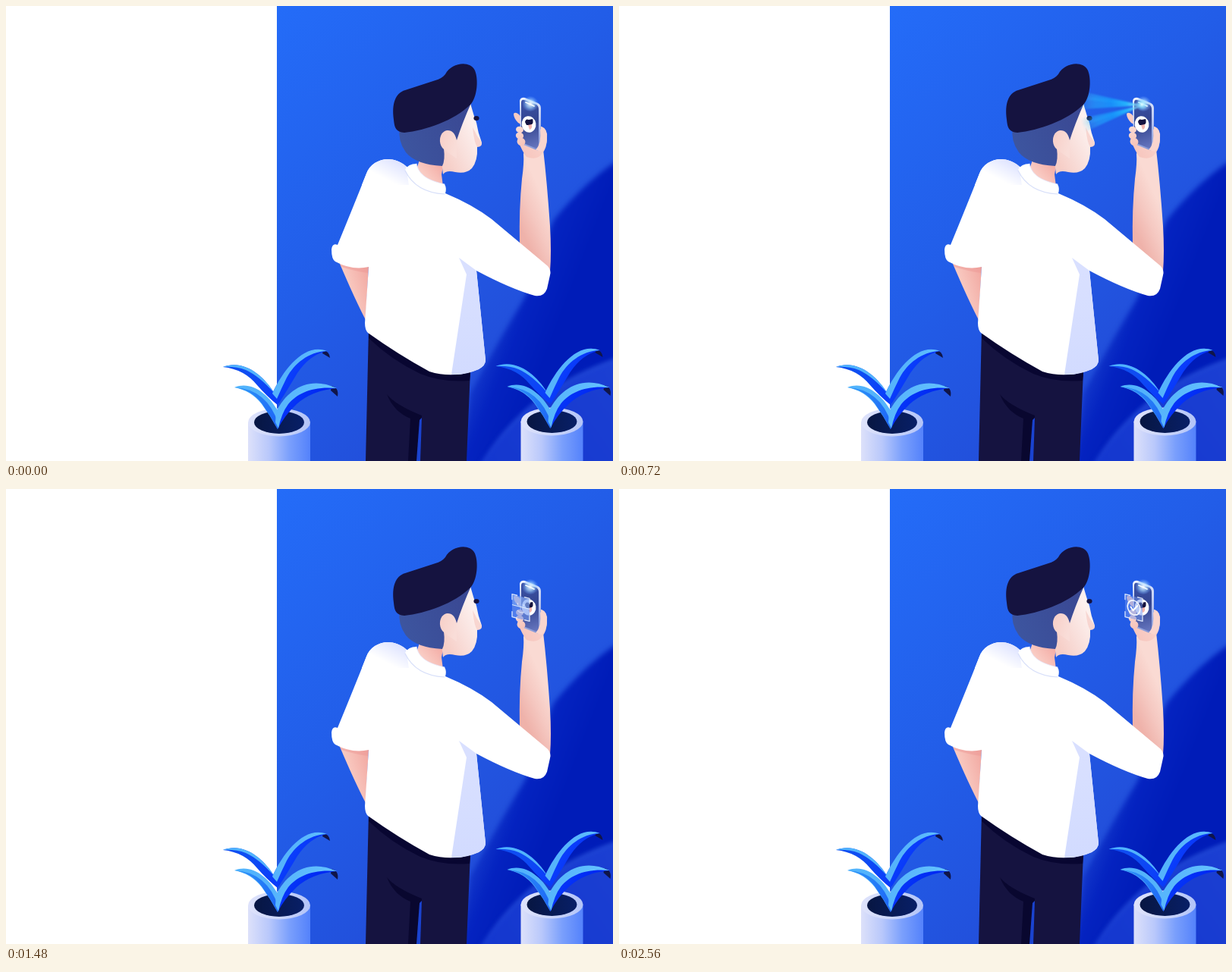
An HTML page with a canvas that plays this animation: 800 px wide and 600 px high, repeating every 3000 ms.

```html
<!DOCTYPE html>
<html lang="en">
<head>
<meta charset="utf-8">
<style>
html, body { margin: 0; width: 100%; height: 100%; overflow: hidden; background: #fff; }
canvas { display: block; width: 800px; height: 600px; }
</style>
</head>
<body>
<canvas id="stage" width="800" height="600"></canvas>
<script>
const ctx = document.getElementById('stage').getContext('2d');
const LOOP = 3000, STEP = 40, LAST = 2560;
const NAVY = '#151340';
let now = 0;

const clamp = v => Math.max(0, Math.min(1, v));
const ease = v => v * v * (3 - 2 * v);
const ramp = (t, a, b) => ease(clamp((t - a) / (b - a)));

function shape(d, paint) {
  ctx.fillStyle = paint;
  ctx.fill(new Path2D(d));
}

function line(d, paint, width) {
  ctx.strokeStyle = paint;
  ctx.lineWidth = width;
  ctx.lineCap = ctx.lineJoin = 'round';
  ctx.stroke(new Path2D(d));
}

function oval(x, y, rx, ry, paint, angle = 0) {
  ctx.fillStyle = paint;
  ctx.beginPath();
  ctx.ellipse(x, y, rx, ry, angle, 0, Math.PI * 2);
  ctx.fill();
}

function addStops(g, colors) {
  colors.forEach((c, i) => g.addColorStop(i / (colors.length - 1), c));
  return g;
}
const linear = (x0, y0, x1, y1, ...colors) =>
  addStops(ctx.createLinearGradient(x0, y0, x1, y1), colors);
const radial = (x, y, r, ...colors) =>
  addStops(ctx.createRadialGradient(x, y, 0, x, y, r), colors);

function wall() {
  ctx.fillStyle = '#fff';
  ctx.fillRect(0, 0, 800, 600);
  ctx.save();
  ctx.beginPath();
  ctx.rect(357, 0, 443, 600);
  ctx.clip();
  ctx.fillStyle = linear(357, 0, 780, 440, '#246cf8', '#225de8', '#224ad6');
  ctx.fillRect(357, 0, 443, 600);
  ctx.filter = 'blur(3px)';
  shape('M810 201 C770 227 744 256 722 282 C700 330 697 365 678 394 Q650 440 612 510 L600 610 L625 610 Q680 505 810 463Z',
    linear(605, 470, 695, 505, 'rgba(0,28,184,.1)', '#0423c0', '#001cb8'));
  shape('M622 610 Q684 510 810 465 V610Z', linear(630, 600, 800, 480, '#1437cf', '#1b3fd2'));
  ctx.restore();
}

function trousers() {
  shape('M478 425 L612 480 L607 600 H474Z', NAVY);
  shape('M478 428 L612 484 L611 494 Q575 497 546 485 Q508 467 478 438Z', '#080631');
  shape('M502 512 Q513 526 548 540 L544 600 H530 L533 544 Q511 535 502 512Z', '#09072f');
  shape('M545 546 L548 543 L546 600 H541Z', '#1a43d0');
}

function shirt() {
  shape('M440 340 L478 342 L474 414 Q459 385 440 340Z',
    linear(440, 370, 479, 358, '#fbd4cb', '#f2aaa3'));
  shape('M440 340 L478 342 L477 352 Q457 349 442 344Z', 'rgba(236,150,146,.45)');
  shape('M437 315 Q458 264 475 221 C482 202 508 195 527 211 L579 247 Q615 262 640 281 L714 343 Q719 349 717 355 L713 373 Q709 384 697 382 Q665 373 620 349 L632 467 Q632 474 623 479 Q590 492 558 482 Q516 459 477 431 Q473 427 473 418 L478 344 Q456 349 434 337 Q429 334 429 321 Q430 312 437 315Z', '#fff');
  shape('M475 221 C482 202 508 195 527 211 L531 236 L469 236Z',
    linear(505, 199, 492, 224, '#dfe4ff', '#fff'));
  shape('M597 332 L620 349 L632 467 Q632 474 623 479 Q606 487 587 486 L607 354Z',
    linear(600, 350, 610, 485, '#d9e0ff', '#d2dbff'));
}

function head(beam) {
  shape('M546 200 H578 L574 222 L576 238 Q553 234 541 215Z',
    linear(575, 208, 548, 232, '#f3aaa3', '#fbd6ce'));
  shape('M526 216 Q530 208 541 208 C544 223 556 230 578 235 Q581 240 579 247 Q549 249 531 228Z', '#fff');
  line('M526 217 Q540 246 578 248', '#d7dff9', 1.2);
  line('M541 208 C544 223 556 230 578 235', '#e6eaff', .8);

  shape('M612 128 Q616 143 620 154 Q622 167 627 180 Q628 185 621 186 Q622 204 614 214 Q606 222 592 219 Q580 216 576 222 L574 205 L577 173Z',
    linear(574, 196, 624, 172, '#f6cec7', '#f9e0dc', '#fdf1ef'));
  shape('M615 160 Q620 171 627 180 Q628 186 621 186 Q617 180 615 160Z', 'rgba(244,190,181,.5)');
  oval(620, 148, 3.6, 3, NAVY);
  shape('M519 160 Q516 178 527 193 Q540 209 575 211 Q579 203 577 188 L593 180 Q601 155 613 128Z',
    linear(520, 180, 604, 150, '#3d559f', '#3a4994'));
  shape('M576 188 C569 181 571 165 582 164 Q591 164 594 177 L594 201 Q583 194 576 188Z',
    linear(572, 175, 594, 180, '#f7d0c9', '#f9ddd8'));
  if (beam > 0) lights(beam);
  shape('M511 150 C508 129 513 115 526 111 L566 98 Q574 96 579 90 C587 75 611 71 618 85 C623 97 621 121 612 130 C591 151 553 164 525 167 C514 166 512 161 511 150Z', NAVY);
}

// Two fans of light that narrow slowly while they shine.
function lights(alpha) {
  const narrow = ramp(now, 500, 960);
  const swing = Math.sin(now / 150);
  ctx.save();
  ctx.globalAlpha = alpha;
  ctx.beginPath();
  ctx.rect(604, 100, 90, 90);
  ctx.clip();
  ctx.filter = 'blur(.8px)';
  const paint = radial(690, 131, 84, 'rgba(200,250,255,.95)', 'rgba(40,190,255,.9)',
    'rgba(22,160,255,.75)', 'rgba(40,180,255,.5)', 'rgba(90,210,250,0)');
  const fan = (top, bottom) => shape(`M690 131 L604 ${top} L604 ${bottom}Z`, paint);
  fan(106 + 11 * narrow, 138 - 3 * narrow);
  fan(148 + 3 * narrow, 175 - 9 * narrow);
  ctx.globalAlpha *= .55;
  fan(118 + swing, 124 + swing);
  fan(154 - swing, 160 - swing);
  ctx.restore();
}

function phoneAndHand() {
  shape('M684 190 L708 189 Q713 232 717 290 Q719 326 717 350 L677 314 Q676 268 680 228 Q683 207 682 195Z',
    linear(677, 290, 717, 272, '#efb2aa', '#f5c8c1', '#fadad3'));
  shape('M674 176 Q681 193 686 199 Q701 204 707 194 Q713 187 713 174 Q714 162 706 159 L689 160Z',
    linear(674, 190, 713, 170, '#f6c4bc', '#fad5ce'));
  shape('M669 142 Q673 138 680 148 L682 158 L675 154 Q669 148 669 142Z', '#f8cbc2');

  shape('M677 125 Q678 120 684 121 L701 128 Q705 130 705 135 L705 186 Q705 192 699 190 L682 183 Q678 181 678 176Z',
    linear(678, 120, 707, 190, '#f3f7ff', '#b9c6f1', '#7f91d2'));
  shape('M679 128 Q679 123 683 124 L699 130 Q702 132 702 136 L702 184 Q702 189 697 187 L682 181 Q679 180 679 175Z',
    linear(680, 125, 698, 186, '#3b52a6', '#33448f', '#6474bd'));
  oval(689, 156, 9.4, 10.8, '#fff', -.15);
  shape('M684 153 Q685 148 689 150 L694 149 Q696 154 692 157 L686 157Z', NAVY);
  shape('M688 157 L693 156 Q694 162 690 163Z', '#f3b6b0');
  oval(691, 129, 11, 10, radial(691, 129, 11, '#fff', 'rgba(165,215,255,.65)', 'rgba(90,150,255,0)'));
  line('M685 127 L696 132', '#f4fbff', 1.8);

  const fingers = linear(672, 155, 684, 185, '#fce0d9', '#f6c1b7');
  oval(677, 163, 5, 4.2, fingers, .25);
  oval(677, 171, 5.2, 4.4, fingers, .3);
  oval(679, 179, 5.5, 5.2, fingers, .4);
  shape('M704 163 Q710 157 713 170 Q714 184 706 192 L698 190 Q706 181 704 163Z', '#fad5ce');
}

// Tilted scan frame; a bar sweeps it, then a ring and a tick are drawn.
function badge() {
  const show = ramp(now, 1160, 1400);
  if (!show) return;
  const done = ramp(now, 2280, 2440);
  const tick = ramp(now, 2360, 2560);
  ctx.save();
  ctx.globalAlpha = show;
  ctx.transform(1, .25, 0, 1, 678.5, 156.5);
  ctx.scale(.7 + .3 * show, .7 + .3 * show);
  ctx.fillStyle = `rgba(112,148,240,${.6 - .1 * done})`;
  ctx.fillRect(-11.5, -15, 23, 30);
  line('M-11.5 -8 V-15 H-5 M5 -15 H11.5 V-8 M11.5 8 V15 H5 M-5 15 H-11.5 V8', 'rgba(236,243,255,.9)', 1.3);
  if (done < 1) {
    ctx.globalAlpha = show * (1 - done);
    const y = -1 + 9 * Math.sin((now - 1480) / 480 * Math.PI * 2);
    ctx.fillStyle = 'rgba(160,200,255,.28)';
    ctx.fillRect(-11, -14, 22, y + 14);
    line(`M-11 ${y} H11`, 'rgba(232,245,255,.9)', 1.2);
    line('M-4 -5 V-3 M4 -5 V-3 M-4 5 Q0 8 4 5', 'rgba(239,246,255,.7)', 1.1);
  }
  if (done > 0) {
    ctx.globalAlpha = show;
    ctx.strokeStyle = '#f4f8ff';
    ctx.lineWidth = 1.7;
    ctx.beginPath();
    ctx.ellipse(0, 0, 8.3, 9.5, 0, -Math.PI / 2, Math.PI * (2 * done - .5));
    ctx.stroke();
    ctx.setLineDash([16 * tick, 30]);
    if (tick) line('M-4 0 L-1 4 L5 -4', '#fff', 1.9);
  }
  ctx.restore();
}

function plant(x, y) {
  ctx.save();
  ctx.translate(x, y);
  shape('M-41 -8 V60 H41 V-8Z', linear(-41, 0, 41, 0, '#dde1fa', '#b9c8fb', '#7a9ffc', '#5482fb'));
  oval(0, -8, 41, 18.5, linear(-41, 0, 41, 0, '#dfe3fb', '#cbd6fb', '#b3c4f8'));
  oval(0, -8, 33, 15, linear(-33, 0, 33, 0, '#071642', '#081f67'));

  const light = linear(-70, -80, 70, -30, '#4fb4fd', '#55b3fb', '#66c4ff');
  const blue = linear(-40, -70, 35, -20, '#0f4df2', '#0a3dfb', '#0029f3');
  shape('M58 -103 Q66 -102 67 -93 L57 -99Z M69 -56 Q79 -54 77 -42 L68 -50Z', '#101548');

  shape('M-74 -81 C-48 -91 -22 -72 -6 -46 L-1 -30 Q-16 -42 -29 -57 Q-46 -78 -74 -81Z', blue);
  shape('M-74 -81 C-48 -91 -22 -72 -6 -46 Q-26 -69 -44 -77 Q-57 -82 -74 -81Z', light);
  shape('M-9 -46 C7 -80 34 -113 63 -102 Q40 -97 24 -73 Q11 -51 -1 -32Z', blue);
  shape('M-9 -46 C7 -80 34 -113 63 -102 C38 -101 20 -85 10 -67 Q3 -53 -3 -39Z', light);
  shape('M-59 -54 C-37 -63 -13 -46 1 -18 L-2 1 Q-11 -16 -23 -32 Q-37 -50 -59 -54Z', light);
  shape('M-59 -54 Q-37 -51 -23 -33 Q-11 -16 -2 1 L-1 -6 Q-16 -52 -59 -54Z', linear(-50, -50, 0, 0, '#2b8df8', '#1c62f6'));
  shape('M-2 -20 C11 -50 40 -69 76 -53 Q43 -50 23 -32 Q7 -17 -2 1Z', blue);
  shape('M-4 -22 C11 -52 40 -70 76 -53 C43 -56 24 -46 12 -32 Q3 -20 -1 0 L-5 -8Z', light);
  ctx.restore();
}

function draw(t) {
  now = Math.min(Math.floor(t / STEP) * STEP, LAST);
  const beam = ramp(now, 0, 160) * (1 - .15 * ramp(now, 640, 920) - .85 * ramp(now, 920, 1160));
  wall();
  trousers();
  phoneAndHand();
  shirt();
  head(beam);
  if (beam > 0) {
    oval(689, 130, 8, 8, radial(689, 130, 8, `rgba(235,255,255,${beam})`,
      `rgba(110,220,255,${beam * .5})`, 'rgba(70,180,255,0)'));
  }
  badge();
  plant(360, 557);
  plant(719.5, 556);
}

function tick() {
  draw(performance.now() % LOOP);
  requestAnimationFrame(tick);
}
tick();
</script>
</body>
</html>
```
